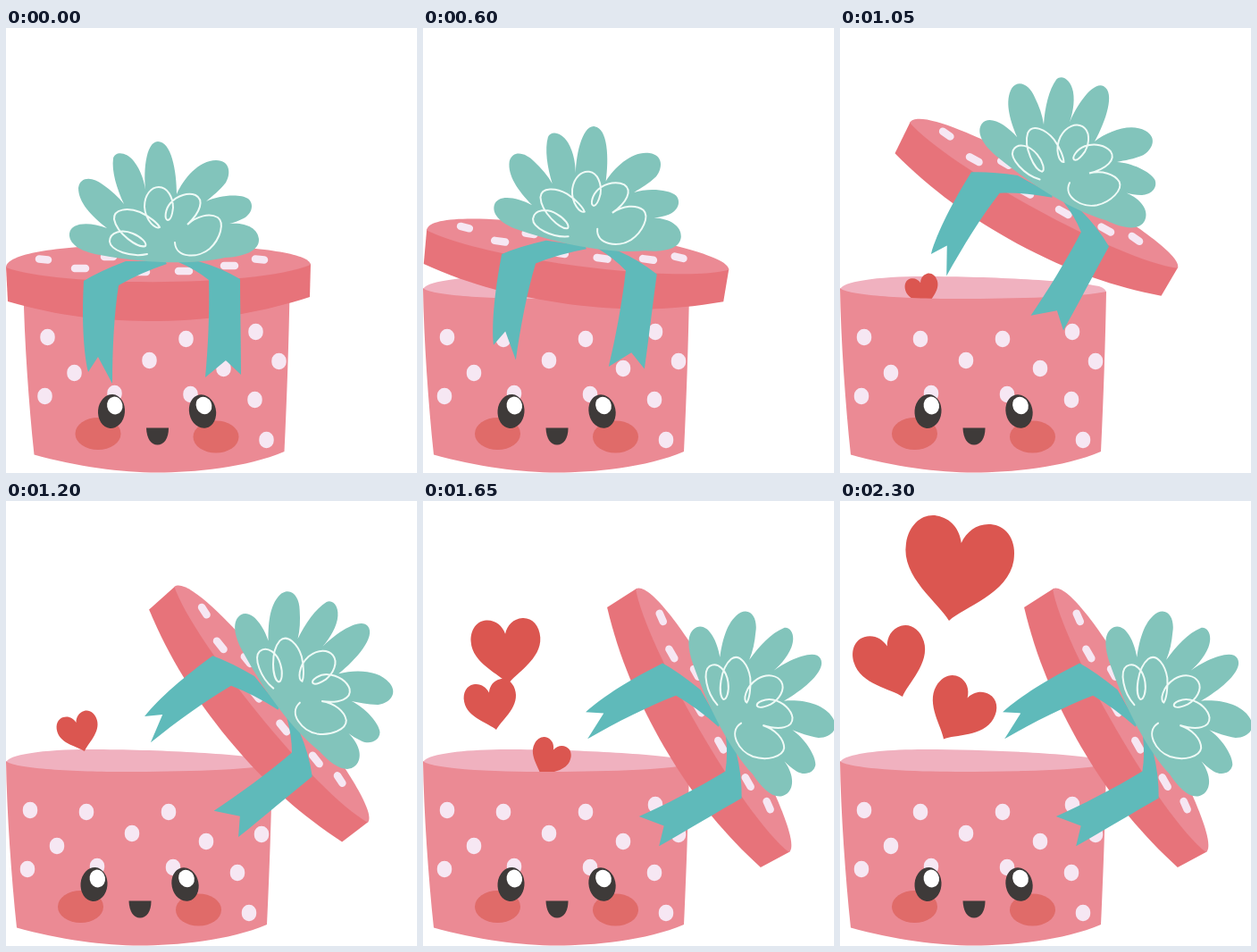
An HTML page that plays this animation: 460x498 px, repeating every 2.8 s.

```html
<!DOCTYPE html>
<html lang="en">
<head>
<meta charset="utf-8">
<title>Gift box</title>
<style>
  html, body { margin: 0; width: 100%; height: 100%; overflow: hidden; background: #fff; }
  svg { display: block; width: 100vw; height: 100vh; }
  .pink { fill: #eb8a94; }
  .rim { fill: #e7737a; }
  .inside { fill: #f0b1bf; }
  .dots { fill: none; stroke: #f6e7f3; stroke-width: 16.4; stroke-linecap: round; }
  .flat { stroke-width: 8.5; }
  .ribbon { fill: #5fbaba; }
  .bow { fill: #82c4bb; }
  .curl { fill: none; stroke: #eefaf6; stroke-width: 2; stroke-linecap: round; }
  .heart { fill: #db5650; }
  .cheek { fill: #e06b69; }
  .dark { fill: #3e3a39; }
  .shine { fill: #fff; }
</style>
</head>
<body>
<svg viewBox="0 0 460 498">
  <defs>
    <path id="heart" class="heart" d="M0 0C-14-18-61-40-61-78C-61-100-48-114-32-114C-16-114-4-103 0-88C4-103 16-114 32-114C48-114 61-100 61-78C61-40 14-18 0 0Z"/>
  </defs>
  <g class="box">
    <path class="inside" d="M0 293C1 284 40 278 95 278C170 278 260 283 290 289Q298 292 298 296L290 310H10Z"/>
  </g>
  <use id="big" href="#heart"/>
  <use id="left" href="#heart"/>
  <use id="right" href="#heart"/>
  <g class="box">
    <path class="pink" d="M0 291C8 299 70 303 130 303C200 303 270 301 298 295C297 350 295 410 292 474C250 492 190 497.5 150 497.5S60 491 12 477.5C6 420 1 350 0 291Z"/>
    <path class="dots" d="M27 345v2M90 347v2M182 347v2M260 339v2M141 371v2M57 385v2M224 380v2M286 372v2M24 411v2M102 408v2M187 409v2M259 415v2M272 460v2"/>
    <ellipse class="cheek" cx="83.5" cy="454" rx="25.5" ry="18"/>
    <ellipse class="cheek" cx="215.5" cy="457.5" rx="25.5" ry="18"/>
    <ellipse class="dark" cx="98.5" cy="429" rx="15" ry="19" transform="rotate(5 98.5 429)"/>
    <ellipse class="dark" cx="200.5" cy="429" rx="15" ry="19" transform="rotate(-12 200.5 429)"/>
    <ellipse class="shine" cx="102.3" cy="422.5" rx="8.7" ry="10" transform="rotate(-10 102.3 422.5)"/>
    <ellipse class="shine" cx="202" cy="422.5" rx="8.7" ry="10" transform="rotate(-25 202 422.5)"/>
    <path class="dark" d="M137.5 447.5H162.5C162.5 460 157 466.5 150 466.5C143 466.5 138 460 137.5 447.5Z"/>
  </g>
  <g id="lid">
    <path class="rim" d="M0 267L2 306C60 323 110 328 170 328C240 327 290 317 340 301L341 264Z"/>
    <path class="pink" d="M0 268C0 252 60 245 120 243H220C280 245 340 252 341 265C280 290 60 290 0 268Z"/>
    <path class="dots flat" d="M37 258.5l10 1M77 269h12M110 256h10M145 273h12M193 272h12M244 266h12M279 258.5l10 1"/>
    <path class="ribbon" d="M178 261L134 261Q105 272 87 283C85 320 86 360 92 385L103 368L119 398C119 360 121 320 126 288Q150 274 180 264Z"/>
    <path class="ribbon" d="M193 262Q212 270 227 282C228 320 226 360 223 391L246 372L263 388C263 350 262 310 262 281Q240 268 215 261Z"/>
    <path class="bow" d="M105 254C82 250 70 241 71 230C73 217 94 217 113 224C95 210 81 195 81 179C83 165 98 167 108 175C118 182 126 189 132 197C124 180 118 160 120 146C122 138 134 138 143 149C151 159 155 172 157 186C153 164 156 127 170 127C185 127 191 160 191 186C199 168 216 148 235 148C251 148 252 163 246 173C239 182 231 188 224 194C238 187 262 185 271 191C279 198 274 209 266 213C260 216 255 218 250 219C268 217 282 224 283 236C284 250 265 256 245 257C210 265 160 264 105 254Z"/>
    <path class="curl" d="M158 253C140 257 117 249 116 239C116 228 130 225 142 230C152 234 158 241 156 244C148 247 124 230 121 214C120 202 137 201 150 206C161 211 170 219 172 223C168 226 156 216 155 200C155 186 163 178 171 178C181 178 187 190 187 201C186 210 184 215 181 215C177 214 178 203 184 196C192 187 204 184 212 187C222 192 218 206 203 220C214 210 228 207 237 212C245 218 240 236 228 247C215 258 190 258 189 240"/>
  </g>
</svg>
<script>
const LOOP = 2800, STEP = 150, LAST = 2300;
const $ = id => document.getElementById(id);
const boxes = document.querySelectorAll('.box');

// Key poses: time, x, y, angle, scale
const LID = [
  [0, 171, 303.5, 0, 1], [450, 169, 298.5, 6, 1], [750, 168, 271.7, 10, 1],
  [1050, 210.5, 220, 29, 1], [1350, 292, 264.5, 60.3, 1]
];
const HEARTS = {
  big: [[1050, 98, 311, -17, .305], [1350, 78, 249, -16, .455], [1950, 113, 160.5, 9, .82], [LAST, 122, 134, 9, 1]],
  left: [[1350, 110, 320, 10, .36], [1650, 82, 256, -11, .48], [1950, 71, 230, -17, .545], [LAST, 70, 219, -17, .67]],
  right: [[1650, 132, 307, 26, .36], [1950, 116, 271, 30, .495], [LAST, 116, 266.5, 30, .605]]
};

// Steady between keys, slowing down into the last one
function poseAt(keys, t) {
  const end = keys.length - 1;
  let i = keys.findIndex(k => k[0] >= t);
  if (i < 0) i = end;
  if (i === 0) return keys[0];
  const from = keys[i - 1], to = keys[i];
  const u = Math.min(1, (t - from[0]) / (to[0] - from[0]));
  const e = i === end ? Math.sin(u * Math.PI / 2) : u;
  return from.map((v, n) => v + (to[n] - v) * e);
}

const place = ([, x, y, angle, scale]) => `translate(${x} ${y}) rotate(${angle}) scale(${scale})`;

function draw(t) {
  const lid = poseAt(LID, t);
  $('lid').setAttribute('transform', place(lid) + ' translate(-171 -303.5)');

  // The closed box tips with its lid, then settles to the left
  const tip = t < 450 ? `rotate(${lid[3]} 198 268) translate(19.5 0)` : '';
  boxes.forEach(b => b.setAttribute('transform', tip));

  for (const id in HEARTS) {
    const keys = HEARTS[id];
    $(id).style.display = t < keys[0][0] ? 'none' : '';
    $(id).setAttribute('transform', place(poseAt(keys, t)));
  }
}

// Motion is held for one step at a time
const hold = t => t >= LAST ? LAST : Math.min(2100, Math.floor(t / STEP) * STEP);

const start = performance.now();
function tick() {
  draw(hold((performance.now() - start) % LOOP));
  requestAnimationFrame(tick);
}
tick();
</script>
</body>
</html>
```
